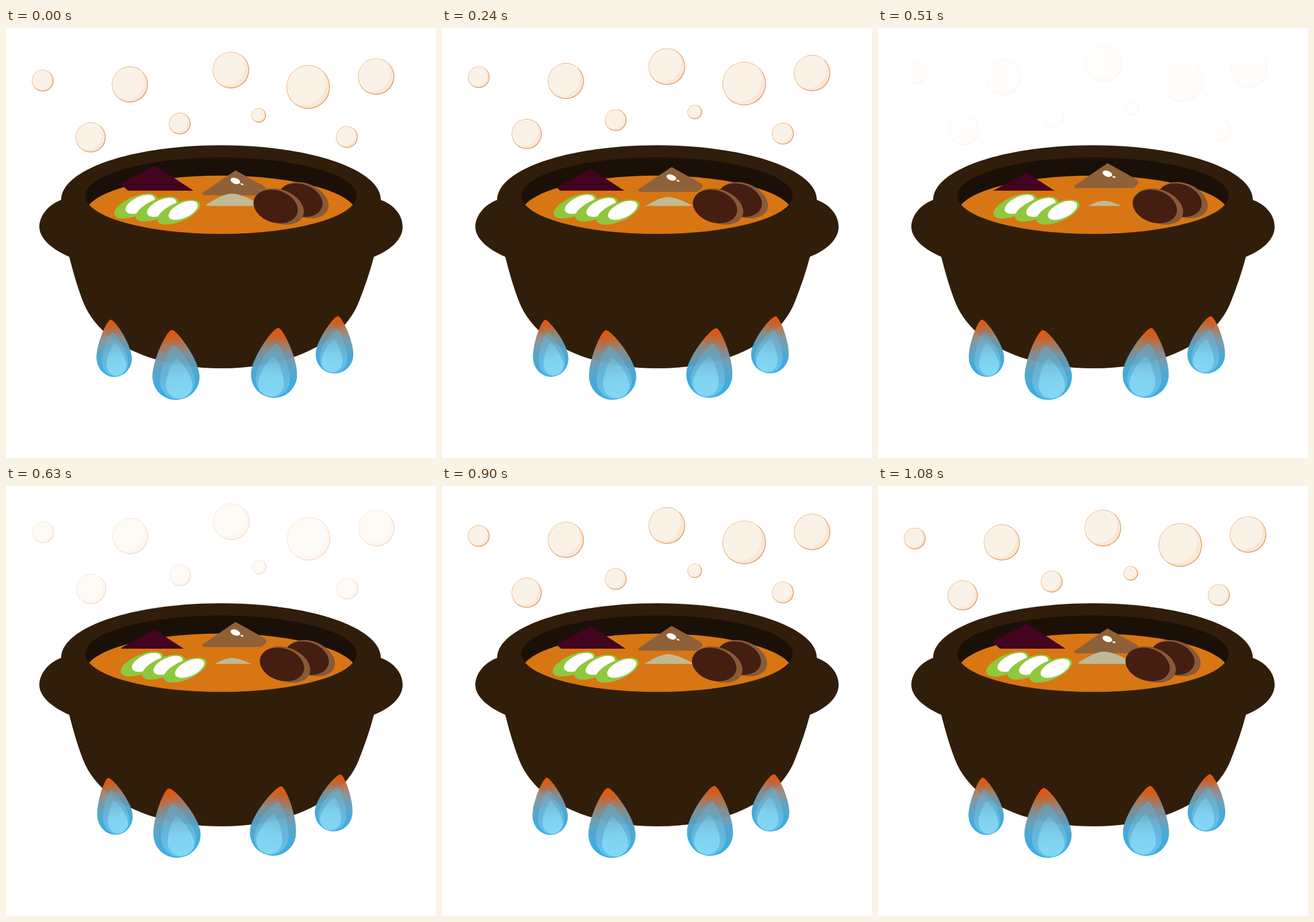
Animation, 748 px wide and 748 px high, one loop 1.11 s. Source, as an HTML page:

```html
<!DOCTYPE html>
<html lang="en">
<head>
<meta charset="utf-8">
<title>Simmering stew</title>
<style>
  html, body { margin: 0; width: 100%; height: 100%; overflow: hidden; background: #fff; }
  svg { display: block; width: 100%; height: 100%; }
</style>
</head>
<body>
<svg viewBox="0 0 748 748">
  <defs>
    <linearGradient id="outer" x1="0" y1="0" x2="0" y2="1">
      <stop offset="0" stop-color="#f0560a"/>
      <stop offset=".1" stop-color="#d8601f"/>
      <stop offset=".34" stop-color="#84939a"/>
      <stop offset=".6" stop-color="#4fa5cd"/>
      <stop offset=".85" stop-color="#36abe2"/>
    </linearGradient>
    <linearGradient id="middle" x1="0" y1="0" x2="0" y2="1">
      <stop offset="0" stop-color="#7d9aa6"/>
      <stop offset=".45" stop-color="#62b1d6"/>
      <stop offset="1" stop-color="#62c0ec"/>
    </linearGradient>
    <linearGradient id="inner" x1="0" y1="0" x2="0" y2="1">
      <stop offset="0" stop-color="#6fb6d2"/>
      <stop offset=".5" stop-color="#7bd0f0"/>
      <stop offset="1" stop-color="#80d6f5"/>
    </linearGradient>
    <path id="drop" d="M0-61C9-61 41-8 41 21A41 40 0 0 1-41 21C-41-8-9-61 0-61Z"/>
    <g id="flame">
      <use href="#drop" fill="url(#outer)"/>
      <use href="#drop" fill="url(#middle)" transform="translate(1.5 13) scale(.74 .77)"/>
      <use href="#drop" fill="url(#inner)" transform="translate(4 24) scale(.56 .57)"/>
    </g>
    <g id="mushroom">
      <ellipse rx="44" ry="29" fill="#885a38" transform="translate(476 310.5) rotate(22)"/>
      <ellipse rx="39.5" ry="28" fill="#451e12" transform="translate(469 310.5) rotate(18)"/>
    </g>
    <g id="onion">
      <ellipse rx="40" ry="16.5" fill="#8fc83c" transform="rotate(-23)"/>
      <ellipse rx="27.5" ry="13" fill="#fff" transform="translate(7.8 -3) rotate(-25)"/>
    </g>
    <ellipse id="mouth" cx="374" cy="291.7" rx="236" ry="66.5"/>
    <clipPath id="mouthClip"><use href="#mouth"/></clipPath>
    <clipPath id="seaweedClip"><path d="M0 0H748V283H0Z"/></clipPath>
    <clipPath id="radishClip"><path d="M0 0H748V309.5H0Z"/></clipPath>
  </defs>

  <path fill="#301e0b" d="M96 299C96 246 220 204 374 204S652 246 652 299C676 308 690 326 690 346
    C690 368 668 387 640 398C633 425 624 450 614 476C585 550 490 592 375 592
    C258 592 163 550 134 476C124 450 117 425 110 398C80 385 58 366 58 346C58 328 72 308 96 299Z"/>
  <use href="#mouth" fill="#1b1007"/>
  <g clip-path="url(#mouthClip)"><use href="#mouth" y="31.5" fill="#d87613"/></g>

  <g clip-path="url(#seaweedClip)">
    <path class="sink" fill="#42041f" d="M256 240.5Q258.500 238.500 261 240.500L330 285.500H215L202 274Q199 271.500 202 269.500Z"/>
  </g>
  <g class="rise">
    <path fill="#8e6138" d="M397 249.200Q399.500 247 402 249.200L450 276Q455 280 452 284L446 289.500Q445 291 442 291H345Q341 291 341.500 287Z"/>
    <ellipse rx="8.700" ry="5" fill="#fff" transform="translate(399 266) rotate(20)"/>
    <ellipse rx="2.800" ry="1.400" fill="#fff" transform="translate(410.500 271.700) rotate(20)"/>
  </g>
  <g clip-path="url(#radishClip)">
    <path class="sink" fill="#c1ba96" d="M351 310Q346 308 350 306C364 298 380 288 393 288S424 297 440 305Q444 308 439 310Z"/>
  </g>
  <g class="drift">
    <use href="#mushroom" x="43" y="-11"/>
    <use href="#mushroom"/>
    <use href="#onion" x="225.500" y="309.700"/>
    <use href="#onion" x="263" y="315"/>
    <use href="#onion" x="300.500" y="320.200"/>
  </g>

  <g id="flames" opacity=".97"></g>
  <g id="bubbles"></g>
</svg>
<script>
const STEP = 30, LOOP = 1110, HALF = 18, TRAVEL = 13.3;

// x, y, radius
const bubbleSpecs = [
  [64, 91.5, 18.7], [215.5, 98.2, 31.2], [391.2, 73.2, 31.7],
  [525.7, 102.7, 37.7], [643.8, 84.4, 31.5], [302.2, 166.3, 18.7],
  [439.7, 152, 12.4], [593, 189.7, 18.8], [147.3, 190.2, 26]
];
// pivot x, pivot y, scale x, scale y, lean direction
const flameSpecs = [
  [186.6, 557, .75, .82, -1], [293.9, 586, 1, 1, -1],
  [468.2, 582.5, .98, 1, 1], [573, 551, .8, .82, 1]
];
const sway = [0, 2.2, 0, .7, 0, 2.2];

const bubbles = document.getElementById('bubbles');
const flames = document.getElementById('flames');

bubbles.innerHTML = bubbleSpecs.map(([x, y, r]) => `
  <g transform="translate(${x} ${y})">
    <circle r="${r}" fill="#d9852f"/>
    <circle cx="-.3" cy="-.3" r="${r - .75}" fill="#fae7d8"/>
    <path transform="translate(-.3 -.3) scale(${r - .75})" fill="#fbf2e7"
      d="M.64-.768A1 1 0 0 0-.64 .768A1.04 1.04 0 0 0 .64-.768Z"/>
  </g>`).join('');
flames.innerHTML = flameSpecs.map(() => '<use href="#flame"/>').join('');

const move = (selector, x, y) => document.querySelectorAll(selector)
  .forEach(el => el.setAttribute('transform', `translate(${x} ${y})`));

function draw(now) {
  const i = Math.floor((now % LOOP) / STEP);
  const away = HALF - Math.abs(HALF - i);
  const shift = TRAVEL * away / HALF;
  move('.sink', 0, shift);
  move('.rise', 0, -shift);
  move('.drift', shift, 0);

  move('#bubbles', sway[i % 6], -shift);
  bubbles.setAttribute('opacity', Math.min(1, 1.1 * (HALF - away) / 9));

  const lean = 5.3 + 5 * (1 - Math.abs(3 - i % 6) / 3);
  flameSpecs.forEach(([x, y, sx, sy, side], n) => flames.children[n].setAttribute(
    'transform', `translate(${x} ${y}) rotate(${side * lean}) scale(${-side * sx} ${sy})`));
}

const start = performance.now();
function tick() {
  draw(performance.now() - start);
  requestAnimationFrame(tick);
}
tick();
</script>
</body>
</html>
```
